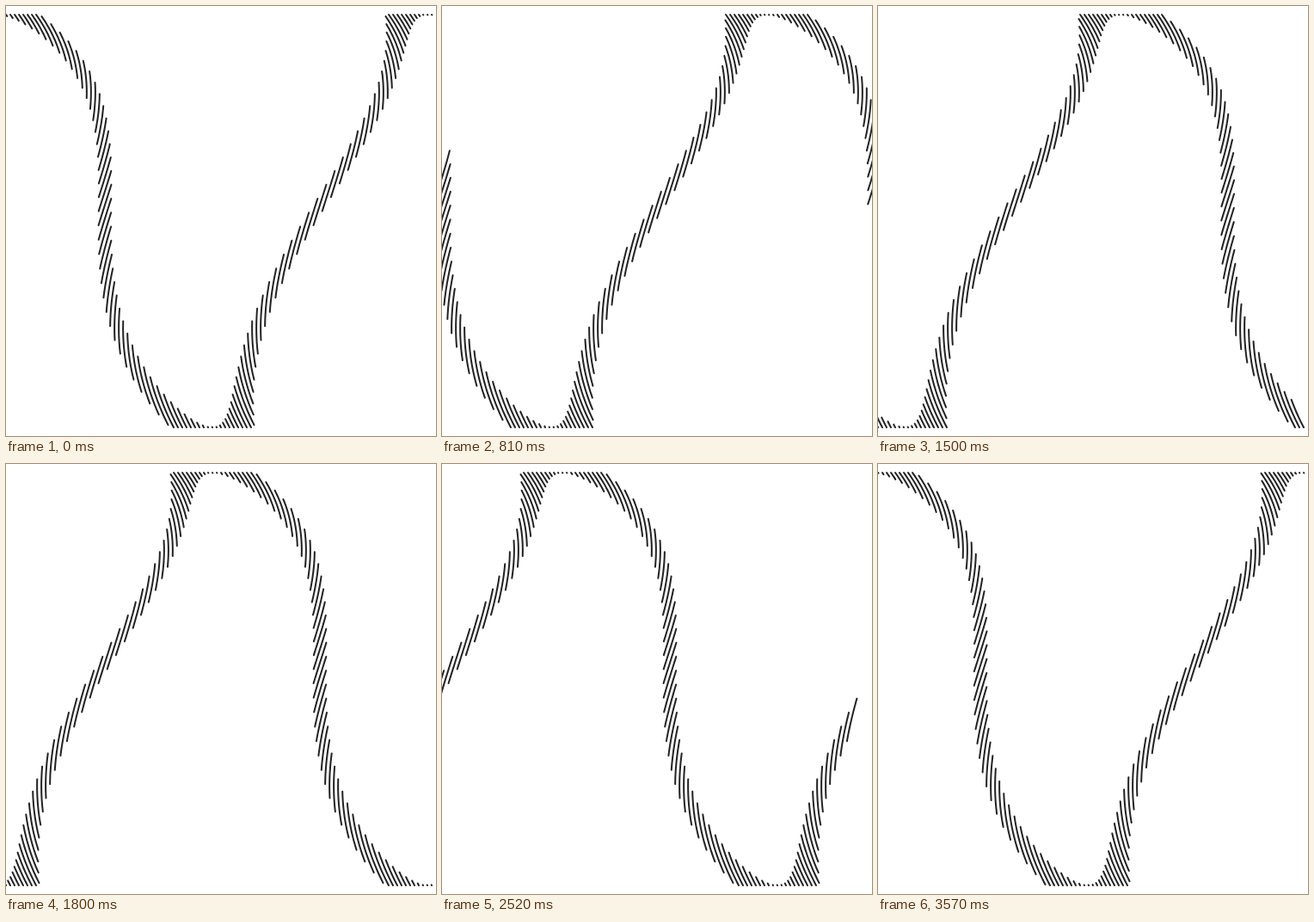
Recreate the animation shown at these times as an HTML page with a canvas. Size 500 by 500 pixels, loop 3600 ms.

```html
<!DOCTYPE html>
<html>
<head>
<meta charset="utf-8">
<style>
  html, body { margin: 0; width: 100%; height: 100%; overflow: hidden; background: #fff; }
  canvas { display: block; }
</style>
</head>
<body>
<canvas id="stage" width="500" height="500"></canvas>
<script>
const ctx = document.getElementById('stage').getContext('2d');
const LOOP = 3600, STEP = 30;
const LINES = 102, GAP = 5, LEFT = -10;
const SPAN = 0.1, PIECES = 16;

const cubic = (a, b, c, d, t) => {
  const r = 1 - t;
  return r * r * r * a + 3 * r * r * t * b + 3 * r * t * t * c + t * t * t * d;
};

// Traces the part of one S-shaped curve between two parameters.
function strand(x, from, to) {
  for (let k = 0; k <= PIECES; k++) {
    const t = from + (to - from) * k / PIECES;
    ctx.lineTo(cubic(x, x + 100, x - 100, x, t), cubic(10, 150, 300, 490, t));
  }
}

function draw(time) {
  ctx.fillStyle = '#fff';
  ctx.fillRect(0, 0, 500, 500);
  ctx.strokeStyle = '#222';
  ctx.lineWidth = 2;
  ctx.lineCap = ctx.lineJoin = 'round';
  for (let i = 0; i < LINES; i++) {
    const wave = Math.cos(2 * Math.PI * (i / 100 + time / LOOP));
    const start = (1 - SPAN) / 2 - (1 + SPAN) / 2 * wave;
    // A tiny remainder keeps a dot visible at both ends of the curve.
    const from = Math.min(Math.max(start, 0), 0.999);
    const to = Math.max(Math.min(start + SPAN, 1), 0.001);
    ctx.beginPath();
    strand(LEFT + i * GAP, from, to);
    ctx.stroke();
  }
}

const origin = performance.now();
function tick() {
  const time = (performance.now() - origin) % LOOP;
  draw(Math.floor(time / STEP) * STEP);
  requestAnimationFrame(tick);
}
tick();
</script>
</body>
</html>
```
